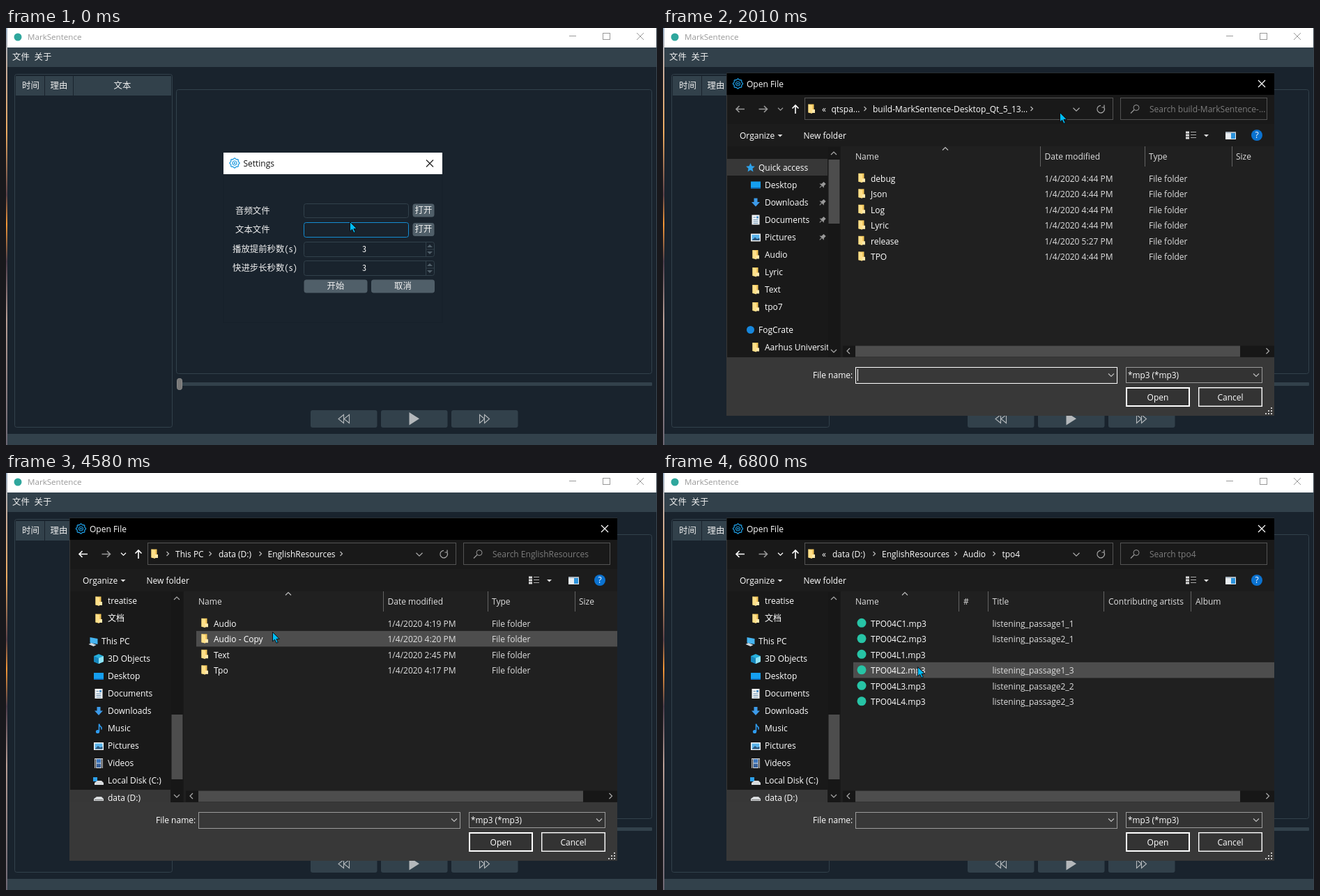
Animation of 934 by 599 pixels, one loop 8 s. Source, as an HTML page:

```html
<!DOCTYPE html>
<html lang="zh">
<head>
<meta charset="utf-8">
<title>MarkSentence</title>
<style>
html, body { margin: 0; width: 100%; height: 100%; overflow: hidden; background: #19232d; }
svg { display: block; width: 934px; height: 599px; }
text { font: 12px 'Open Sans', 'Noto Sans CJK SC', sans-serif; fill: #fff; white-space: pre; }
.cjk { font: 12.4px 'Noto Sans Mono CJK SC', 'Noto Sans CJK SC', sans-serif; fill: #f0f0f0; }
.mid { text-anchor: middle; }
.title { font-size: 11.6px; fill: #999; }
.small { font-size: 11.8px; }
.ink { fill: #111; }
.dim { fill: #7d7d7d; }
.soft { fill: #dedede; }
</style>
</head>
<body>
<svg viewBox="0 0 934 599">
  <defs>
    <linearGradient id="sky" x2="0" y2="1">
      <stop offset="0" stop-color="#9bb0c6"/><stop offset=".12" stop-color="#c9a78f"/>
      <stop offset=".25" stop-color="#e8a860"/><stop offset=".4" stop-color="#5a4148"/>
      <stop offset=".47" stop-color="#ee9436"/><stop offset=".56" stop-color="#4c3d4a"/>
      <stop offset=".7" stop-color="#b59c94"/><stop offset="1" stop-color="#6b6672"/>
    </linearGradient>
    <clipPath id="tree"><rect x="92" y="170" width="145" height="303"/></clipPath>
    <clipPath id="address"><rect x="226" y="101" width="357" height="30"/></clipPath>
  </defs>
  <g id="main"></g>
  <g id="popup"></g>
  <path id="cursor" d="M.5 .5V14L3.6 11.2L6 16.3L8.3 15.3L6 10.4H10.3Z" fill="#00bcf4" stroke="#0b1218"/>
</svg>
<script>
const LOOP = 8000;
const el = id => document.getElementById(id);
const rect = (x, y, w, h, fill, more = '') =>
  `<rect x="${x}" y="${y}" width="${w}" height="${h}" fill="${fill}" ${more}/>`;
const box = (x, y, w, h, stroke, fill = 'none', r = 0) =>
  rect(x + .5, y + .5, w - 1, h - 1, fill, `stroke="${stroke}" rx="${r}"`);
// y is the middle of the line; the baseline sits on a whole pixel.
const text = (x, y, s, cls = '') => `<text x="${x}" y="${Math.round(y + 4.2)}" class="${cls}">${s}</text>`;
const path = (d, stroke, w = 1, fill = 'none') =>
  `<path d="${d}" stroke="${stroke}" stroke-width="${w}" fill="${fill}"/>`;
const shape = (d, fill) => path(d, 'none', 0, fill);
const dot = (x, y, r, fill) => `<circle cx="${x}" cy="${y}" r="${r}" fill="${fill}"/>`;
const at = (x, y, s, turn = 0) => `<g transform="translate(${x} ${y}) rotate(${turn})">${s}</g>`;
const TURN = { down: 0, left: 90, up: 180, right: 270 };
const chevron = (x, y, dir, color = '#aaa', s = 4) =>
  at(x, y, path(`M${-s} ${-s / 2}L0 ${s / 2}L${s} ${-s / 2}`, color, 1.2), TURN[dir]);
const cross = (x, y, color, w = 1.2) => at(x, y, path('M-5 -5L5 5M5 -5L-5 5', color, w));
const arrow = (x, y, turn, color) => at(x, y, path('M-6 0H6M1.5 -4.5L6 0L1.5 4.5', color, 1.6), turn);

function gear(x, y) {
  let d = '';
  for (let i = 0; i <= 48; i++) {
    const a = i * Math.PI / 24, r = 6.4 + .7 * Math.cos(8 * a);
    d += (i ? 'L' : 'M') + (r * Math.cos(a)).toFixed(2) + ' ' + (r * Math.sin(a)).toFixed(2);
  }
  return at(x, y, path(d + 'Z', '#1e9be0', 1.3) +
    '<circle r="3" fill="none" stroke="#1e9be0" stroke-width="1.2"/>' + dot(0, 0, 1.2, '#1e9be0'));
}

const LINE = '#32414b', HOT = '#148cd2', BUTTON = '#505f69';

function mainWindow() {
  const skip = d => path(d, '#b4b8bb', 1.1);
  return rect(0, 0, 934, 599, '#19232d') + rect(0, 0, 934, 28, '#fff') +
    rect(0, 28, 934, 28, LINE) + rect(0, 583, 934, 16, LINE) +
    rect(0, 0, 2, 599, 'url(#sky)') + rect(933, 0, 1, 599, '#3a4650') +
    dot(17, 13, 5.5, '#2fa79d') + text(31, 12.5, 'MarkSentence', 'title') +
    path('M808 11.5H818', '#999') + box(856, 7, 11, 10, '#999') + cross(910, 12, '#999', 1) +
    text(9, 42, '文件', 'cjk') + text(40.5, 42, '关于', 'cjk') +
    box(12, 66, 227, 508, LINE, 'none', 3) +
    rect(14, 69, 41, 28, LINE) + rect(56, 69, 40, 28, LINE) + rect(97, 69, 140, 28, LINE) +
    text(23, 83, '时间', 'cjk') + text(63.5, 83, '理由', 'cjk') + text(154.5, 83, '文本', 'cjk') +
    box(244, 88, 683, 409, LINE, 'none', 3) +
    rect(246, 509, 681, 5, LINE, 'rx="1"') + box(245, 503, 8, 17, '#8a8a8a', '#787878', 3) +
    [437, 538, 639].map(x => rect(x, 549, 95.5, 25, LINE, 'rx="3"')).join('') +
    skip('M484.5 555.5V567.5L477 561.5ZM492.5 555.5V567.5L485 561.5Z') +
    shape('M578.5 552V570.5L593 561.2Z', '#b4b8bb') +
    skip('M679.5 555.5V567.5L686.5 561.5ZM686.5 555.5V567.5L693.5 561.5Z');
}

function settings(s) {
  const edge = name => s.hot === name ? HOT : LINE;
  const button = (x, y, w, label, on) =>
    box(x, y, w, 19, on ? HOT : BUTTON, BUTTON, 2.5) + text(x + w / 2, y + 9, label, 'cjk mid');
  const spin = y => box(427, y, 188, 22, LINE, 'none', 3) + path(`M602.5 ${y + 1}V${y + 21}`, LINE) +
    path(`M603 ${y + 11}H614`, LINE) + text(514, y + 11, '3', 'cjk mid') +
    shape(`M604 ${y + 8}H612L608 ${y + 4}ZM604 ${y + 14}H612L608 ${y + 18}Z`, BUTTON);
  return rect(312, 179, 314, 244, '#19232d', 'stroke="#17202a"') + rect(312, 179, 314, 31, '#fff') +
    gear(328, 194) + text(340.5, 194.5, 'Settings', 'ink') + cross(608, 194.5, '#222') +
    text(329, 263, '音频文件', 'cjk') + text(329, 290, '文本文件', 'cjk') +
    text(325, 318, '播放提前秒数(s)', 'cjk') + text(325, 345, '快进步长秒数(s)', 'cjk') +
    box(427, 252, 151, 21, edge('audio'), 'none', 3) + box(427, 279, 151, 22, edge('text'), 'none', 3) +
    button(583.5, 252.5, 31, '打开', s.hot === 'open') + button(583.5, 280, 31, '打开') +
    spin(307) + spin(334) + button(427.5, 361.5, 91, '开始') + button(524, 361.5, 91, '取消');
}

const EDGE = '#9b9b9b', TRACK = '#171717', THUMB = '#4d4d4d';

const frame = () => rect(91, 64.5, 786, 492.5, '#383838') + rect(91.5, 65, 785.5, 31, '#000') +
  gear(107.5, 80) + text(120, 80.5, 'Open File') + cross(859, 80, '#fff');
const treeBar = (y, h) => rect(237, 171, 17, 302, TRACK) + rect(237.5, y, 16, h, THUMB) +
  chevron(245, 180, 'up') + chevron(245, 464, 'down');

const blank = () => frame() + rect(92, 96, 785, 377, '#fff') + rect(92, 171, 162, 302, '#191919') +
  treeBar(203, 128) + rect(276, 456, 583, 17, TRACK) + rect(276, 456.5, 552, 16, THUMB) +
  rect(215, 490, 56, 17, '#fff') + rect(276, 486.5, 376, 24.5, '#fff') + rect(664, 487, 196, 23, '#fff') +
  rect(664, 516, 92, 28, '#fff') + rect(768, 516, 92, 28, '#fff') + rect(859, 539, 18, 18, '#fff');

const icons = {
  folder: rect(-4.5, -6.5, 8, 12, '#f3c75c') + shape('M-4.5 -6.5L1 -5V7L-4.5 5.5Z', '#ffe08a') + rect(1, 1, 4, 5, '#ffe9ad'),
  star: shape('M0 -6.5L1.9 -2.2L6.4 -1.8L3 1.3L4 6L0 3.5L-4 6L-3 1.3L-6.4 -1.8L-1.9 -2.2Z', '#2ea2ea'),
  desktop: rect(-7, -5, 14, 10, '#159ff0') + rect(-7, 3.5, 14, 1.5, '#0c6dbd'),
  down: shape('M-2.5 -6H2.5V-.5H6L0 6L-6 -.5H-2.5Z', '#3d9be9'),
  doc: rect(-5.5, -7, 11, 14, '#f2f5f7') + path('M-3.5 -3.5H0M-3.5 0H3.5M-3.5 2.5H3.5M-3.5 5H3.5', '#6a8fae') + rect(1, -5, 3, 3, '#4b8fc8'),
  image: rect(-7, -5, 14, 11, '#f4f6f8') + rect(-5.5, -3.5, 11, 8, '#5ab4ec') + shape('M-5.5 4.5L-1 0L2 2.5L5.5 1V4.5Z', '#2b557a'),
  cloud: dot(0, 0, 5.5, '#1787dc'),
  pc: shape('M-5 -6L6 -4V4L-5 2Z', '#45b4f0') + shape('M-7 4L-3 2L4 5L0 7Z', '#cfd8de'),
  cube: shape('M-7 -4L0 -7L7 -4V4L0 7L-7 4Z', '#27b0dc') + shape('M0 -1L7 -4V4L0 7Z', '#8fe3f5') + shape('M-7 -4L0 -1V7L-7 4Z', '#1687bd'),
  music: dot(-1.5, 4.5, 2.6, '#2f9cf0') + path('M.5 4.5V-6.5Q1.5 -3 4 -1.5V1.5', '#2f9cf0', 1.6),
  video: rect(-6, -7, 12, 14, '#dfe3e6') + rect(-3, -6, 6, 5.5, '#3e78c0') + rect(-3, .5, 6, 5.5, '#37609a') + path('M-4.5 -6V7M4.5 -6V7', '#333', 1.4),
  disk: shape('M-7 1L-3 -2H4L7 1V4H-7Z', '#d9dcde') + path('M-6 2.5H6', '#777'),
  sysdisk: rect(-8, -5, 6, 6, '#2ca0ea') + shape('M-6 3L-2 0H4L7 3V6H-6Z', '#d9dcde'),
  audio: dot(0, 0, 6.5, '#27c4a6')
};

// Tree entries: icon, label, centre y; a leading "^" marks a root, a trailing "*" a pin.
const trees = [
  { lit: [188, 24], thumb: [189, 92], items: [
    ['star', '^Quick access', 200.5], ['desktop', 'Desktop*', 225.5], ['down', 'Downloads*', 250.5],
    ['doc', 'Documents*', 275.5], ['image', 'Pictures*', 300.5], ['folder', 'Audio', 325.5],
    ['folder', 'Lyric', 350.5], ['folder', 'Text', 375.5], ['folder', 'tpo7', 400.5],
    ['cloud', '^FogCrate', 433.5], ['folder', 'Aarhus University', 458.5]] },
  { lit: [455, 18], thumb: [347, 93], items: [
    ['folder', 'treatise', 184], ['folder', '文档', 209], ['pc', '^This PC', 242], ['cube', '3D Objects', 267],
    ['desktop', 'Desktop', 292], ['doc', 'Documents', 317], ['down', 'Downloads', 342], ['music', 'Music', 367],
    ['image', 'Pictures', 392], ['video', 'Videos', 417], ['sysdisk', 'Local Disk (C:)', 442], ['disk', 'data (D:)', 467]] }
];

const day = (name, time) => [[298, name], [547.5, '1/4/2020 ' + time + ' PM'], [697, 'File folder']];
const song = (name, title = '') => [[298, name], [472.5, title]];
const folderCols = { sort: 405, heads: [[276, 'Name'], [547.5, 'Date modified'], [697, 'Type'], [822, 'Size']], seps: [541, 691, 816] };
const songCols = { sort: 347, heads: [[276, 'Name'], [431, '#'], [472.5, 'Title'], [639, 'Contributing artists'], [764, 'Album']], seps: [424, 466, 632, 757] };

const dirs = {
  build: { tree: 0, cols: folderCols, icon: 'folder', find: 'build-MarkSentence-...',
    rows: [['debug', '4:44'], ['Json', '4:44'], ['Log', '4:44'], ['Lyric', '4:44'], ['release', '5:27'], ['TPO', '4:44']].map(r => day(...r)) },
  english: { tree: 1, cols: folderCols, icon: 'folder', find: 'EnglishResources',
    rows: [['Audio', '4:19'], ['Audio - Copy', '4:20'], ['Text', '2:45'], ['Tpo', '4:17']].map(r => day(...r)) },
  audio: { tree: 1, cols: folderCols, icon: 'folder', find: 'Audio', long: true,
    rows: Array.from({ length: 11 }, (_, i) => day('tpo' + (i + 1), '4:35')) },
  tpo4: { tree: 1, cols: songCols, icon: 'audio', find: 'tpo4',
    rows: [song('TPO04C1.mp3', 'listening_passage1_1'), song('TPO04C2.mp3', 'listening_passage2_1'), song('TPO04L1.mp3'),
      song('TPO04L2.mp3', 'listening_passage1_3'), song('TPO04L3.mp3', 'listening_passage2_2'), song('TPO04L4.mp3', 'listening_passage2_3')] }
};

const root = [[232, '>'], [243, 'This PC'], [293, '>'], [305, 'data (D:)'], [365, '>'], [375.5, 'EnglishResources']];
const deep = [[228, '«'], [243, 'data (D:)'], [303, '>'], [314, 'EnglishResources'], [420, '>'], [430.5, 'Audio'], [475, '>']];
const crumbs = {
  build: [[228, '«'], [241.5, 'qtspa...'], [290, '>'], [301, 'build-MarkSentence-Desktop_Qt_5_13...'], [529, '>']],
  root, rootEnd: [...root, [481, '>']], rootAudio: [...root, [481, '>'], [493, 'Audio']],
  deep, deepSong: [...deep, [486.5, 'tpo4']]
};

function address(s) {
  const editing = s.edit;
  let out = box(203, 100, 443, 32, editing ? '#8a8a8a' : '#535353', '#191919') + at(213, 116, icons.folder);
  if (editing === 'all') {
    out += `<g clip-path="url(#address)">` + rect(227, 107, 340, 17, '#0078d7') +
      text(228, 116, 'D:\\qtspace\\build-MarkSentence-Desktop_Qt_5_13_2_MinGW') + '</g>';
  } else if (editing) {
    out += text(228, 116, 'D:\\EnglishResources') + (editing === 'caret' ? rect(338, 107, 1, 16, '#fff') : '');
  } else {
    if (s.litRoot) out += rect(225, 102, 14, 29, '#4d4d4d');
    out += crumbs[s.crumb].map(([x, c]) => c === '>' ? chevron(x, 116, 'right', '#bbb', 3) : text(x, 116.5, c)).join('');
  }
  out += chevron(593, 117, 'down', '#aaa', 4.5);
  return out + (editing && editing !== 'all' ? arrow(628, 116.5, 0, '#aaa')
    : path('M632.5 113.5A5.3 5.3 0 1 1 628 111.3M633 110.5V114H629.5', '#aaa', 1.2));
}

function treePane(tree) {
  const row = ([icon, label, y]) => {
    const top = label[0] === '^', pin = label.endsWith('*');
    return at(top ? 125.5 : 133, y, icons[icon]) + text(top ? 137 : 146, y, label.replace(/[\^*]/g, '')) +
      (pin ? at(228, y, shape('M-1.5 -5H3V-1L5 1H-4L-1.5 -1Z', '#999') + path('M.5 1V5', '#999'), 45) : '');
  };
  return rect(92, 170, 163, 303, '#191919') +
    '<g clip-path="url(#tree)">' + rect(92, tree.lit[0], 144, tree.lit[1], '#373737') +
    tree.items.map(row).join('') + '</g>' + treeBar(...tree.thumb);
}

function listPane(s, dir) {
  const right = dir.long ? 859 : 877, { cols } = dir;
  let out = rect(255, 170, 622, 303, '#202020') + chevron(cols.sort, 173.5, 'up', '#bbb', 4);
  out += cols.heads.map(([x, h]) => text(x, 184.5, h, 'soft')).join('');
  out += cols.seps.map(x => rect(x, 170, 1, 29, '#636363')).join('');
  if (s.row >= 0) out += rect(273, 204.4 + 22.5 * s.row, right - 273, 22.5, s.picked ? '#777' : '#4d4d4d');
  dir.rows.forEach((cells, i) => {
    const y = 216.3 + 22.5 * i;
    out += at(285, y - 1, icons[dir.icon]) +
      cells.map(([x, c], k) => text(x, y, c, k ? 'soft' : '')).join('');
  });
  out += rect(258, 456.5, right - 258, 16, TRACK) + rect(276, 456.5, dir.long ? 521 : 552, 16, THUMB) +
    chevron(266, 464, 'left') + chevron(right - 9.5, 464, 'right');
  if (dir.long) out += rect(859.5, 171, 17, 285, TRACK) + rect(860, 188.5, 16, 51.5, THUMB) +
    chevron(867.5, 180, 'up') + chevron(867.5, 447, 'down');
  return out;
}

const tip = () => box(393, 266, 353, 71, '#767676', '#2b2b2b') +
  ['Date created: 1/4/2020 4:20 PM', 'Size: 717 MB', 'Folders: tpo1, tpo2, tpo3, tpo4, tpo5, tpo6, tpo7, tpo8, tpo9, ...', 'Files: TPO_Modify.py']
    .map((line, i) => text(398, 277 + 16.6 * i, line, 'small')).join('');

function files(s) {
  const dir = dirs[s.dir], back = s.dir === 'build' ? '#999' : '#fff';
  const push = (x, label, w) => rect(x + w / 2, 516 + w / 2, 92 - w, 28 - w, '#333', `stroke="#fff" stroke-width="${w}"`) +
    text(x + 46, 530.5, label, 'mid');
  let grip = '';
  for (let i = 0; i < 3; i++) for (let j = 0; j <= i; j++) grip += rect(872 - 4 * j, 545 + 4 * i, 2, 2, '#c8c8c8');
  return frame() + rect(92, 96, 785, 377, '#191919') + rect(92, 138, 785, 32, '#1c1c1c') +
    arrow(111, 116.5, 180, back) + arrow(143.5, 116.5, 0, '#999') + chevron(168.5, 116.5, 'down', back, 3.5) +
    arrow(190, 117, 270, '#fff') + address(s) + box(656, 100, 211, 32, '#535353', '#191919') +
    '<circle cx="679" cy="114.5" r="4" fill="none" stroke="#999"/>' + path('M676 117.5L671 122.5', '#999', 1.2) +
    text(698, 116.5, 'Search ' + dir.find, 'dim') +
    text(110, 154.5, 'Organize') + shape('M164.5 153H171.5L168 156.5Z', '#ddd') + text(201.5, 154.5, 'New folder') +
    [148.5, 152.5, 156.5].map(y => rect(750, y, 5, 3, '#dcdcdc') + path(`M757 ${y + 1}H765`, '#aaa')).join('') +
    shape('M776 153H783L779.5 156.5Z', '#ddd') +
    rect(807, 149, 15, 11, '#e9eef2') + rect(807, 149, 15, 2, '#a9b5bf') + rect(815, 151, 6, 8, '#2b93dc') +
    dot(852, 154, 8, '#0b72d0') + text(852, 154, '?', 'mid') +
    treePane(trees[dir.tree]) + listPane(s, dir) +
    text(215, 499, 'File name:') + box(276, 487, 376, 24, s.focus ? '#fff' : EDGE, '#383838') +
    (s.caret ? rect(279, 490, 1, 17, '#fff') : '') + chevron(643, 498.5, 'down', '#bbb') +
    box(664, 487, 196, 23, EDGE, '#333') + text(667, 498.5, '*mp3 (*mp3)', 'small') + chevron(851, 498.5, 'down', '#bbb') +
    push(664, 'Open', 2) + push(768, 'Cancel', 1.4) + grip + (s.tip ? tip() : '');
}

// Each step: time, pointer x, pointer y, what changes from then on.
const steps = [
  [0, 493, 278, { view: settings, hot: 'text' }],
  [120, 562, 270, { hot: 'audio' }],
  [240, 613, 265, { hot: 'open' }],
  [390, 613, 266],
  [540, 608, 265],
  [940, 608, 265, { view: blank }],
  [1060, 608, 265, { view: files, dir: 'build', crumb: 'build', focus: true, caret: true, row: -1 }],
  [1180, 608, 264, { row: 2 }],
  [1460, 603, 246, { row: 1 }],
  [1620, 588, 205, { row: 0, caret: false }],
  [1740, 568, 162, { row: -1 }],
  [1890, 568, 134],
  [2010, 569, 121, { caret: true }],
  [2320, 569, 121, { focus: false, caret: false, edit: 'all' }],
  [2720, 569, 121, { edit: 'caret' }],
  [3190, 569, 121, { edit: 'typed' }],
  [3490, 569, 121, { edit: '', dir: 'english', crumb: 'root', litRoot: true }],
  [3770, 548, 142, { crumb: 'rootEnd', litRoot: false }],
  [3890, 458, 205, { row: 0 }],
  [4010, 394, 232, { row: 1 }],
  [4160, 390, 249, { row: 2, tip: true }],
  [4280, 385, 232, { row: 1, tip: false }],
  [4430, 383, 232],
  [4580, 382, 228],
  [4700, 382, 225, { row: 0 }],
  [4950, 382, 225, { dir: 'audio', crumb: 'rootAudio' }],
  [5200, 382, 225, { crumb: 'deep' }],
  [5480, 381, 236, { row: 1 }],
  [5600, 378, 256, { row: 2 }],
  [5720, 374, 284, { row: 3 }],
  [5840, 368, 309, { row: 4 }],
  [5960, 365, 278, { row: 3 }],
  [6520, 365, 278, { picked: true }],
  [6800, 365, 278, { picked: false, dir: 'tpo4', crumb: 'deepSong' }]
];
let state = {};
const scenes = steps.map(([, , , change]) => state = { ...state, ...change });

el('main').innerHTML = mainWindow();
let shown = -1;
function draw(now) {
  const t = now % LOOP;
  let i = steps.length - 1;
  while (i && steps[i][0] > t) i--;
  if (i !== shown) {
    const [, x, y] = steps[i];
    el('popup').innerHTML = scenes[i].view(scenes[i]);
    el('cursor').setAttribute('transform', `translate(${x} ${y})`);
    shown = i;
  }
}
const start = performance.now();
const tick = () => { draw(performance.now() - start); requestAnimationFrame(tick); };
tick();
</script>
</body>
</html>
```
